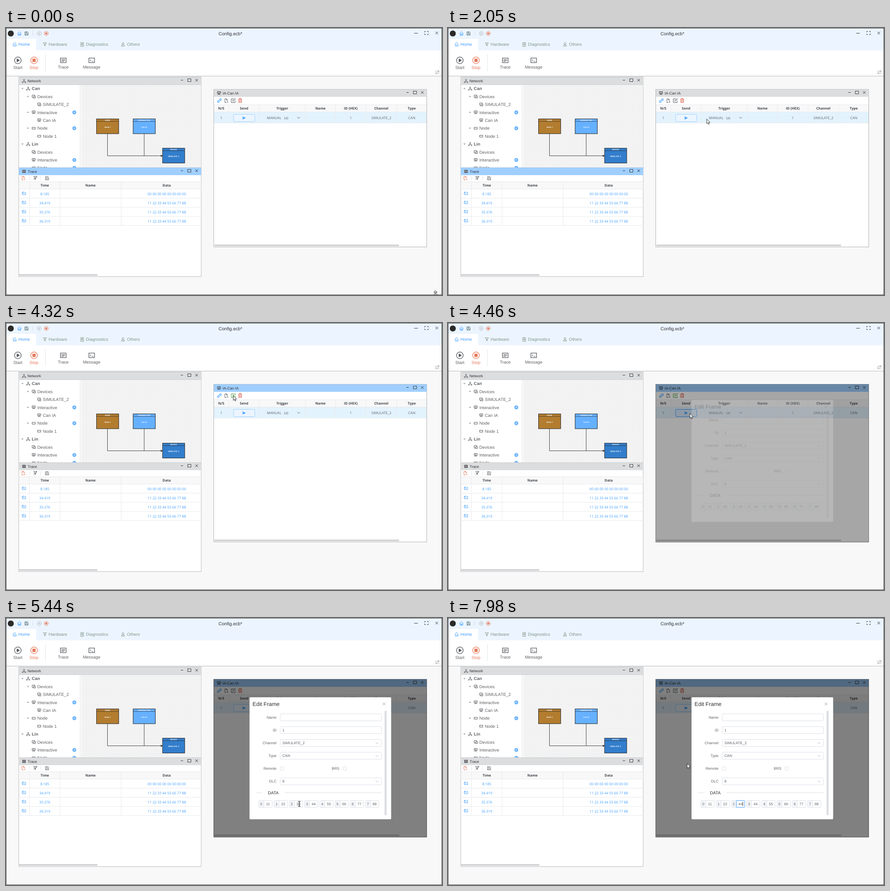
An HTML page for the animation above (8 s loop, 956x586 px).

```html
<!DOCTYPE html>
<html lang="en">
<head>
<meta charset="utf-8">
<title>Config.ecb*</title>
<style>
html, body { margin: 0; width: 100%; height: 100%; overflow: hidden; background: #f8f8f8; }
svg { display: block; }
text { font: 9.44px "Liberation Sans", Arial, sans-serif; fill: #606266; text-rendering: geometricPrecision; }
.m { text-anchor: middle; }
.e { text-anchor: end; }
.b { font-weight: bold; }
.s { font-size: 8.1px; }
.dark { fill: #303133; }
.tab { fill: #83978a; }
.cell { font: 7.7px "Open Sans", "Noto Sans", sans-serif; }
.head { font: bold 7.55px "Open Sans", "Noto Sans", sans-serif; fill: #45484d; }
.tiny { font-size: 3.95px; font-weight: bold; fill: #fff; }
.blue { fill: #409eff; }
.ico { fill: none; stroke: #505358; stroke-width: .95; }
.line { fill: none; stroke: #e8eaec; }
.box { fill: #fff; stroke: #dcdfe6; }

.an, .an * { animation-duration: 8s; animation-iteration-count: infinite; animation-timing-function: linear; }
.an .st { animation-timing-function: step-end; }

#cursor { animation-name: path; }
@keyframes path {
  0% { transform: translate(942px, 583px); }
  5.1%, 8.5% { transform: translate(777px, 387px); }
  16.1%, 17.5% { transform: translate(304px, 321px); }
  20.6%, 22.6% { transform: translate(561px, 205px); }
  27.3%, 33.4% { transform: translate(570px, 196px); }
  36.5% { transform: translate(589px, 199px); }
  39.2%, 41.9% { transform: translate(611px, 190px); }
  45% { transform: translate(592px, 199px); }
  52.2%, 54.8% { transform: translate(498px, 159px); }
  55.7%, 56% { transform: translate(530px, 198px); }
  62.7%, 63% { transform: translate(649px, 388px); }
  65.3%, 73.2% { transform: translate(643px, 408px); }
  76.6% { transform: translate(618px, 393px); }
  80% { transform: translate(640px, 385px); }
  83.4%, 83.8% { transform: translate(669px, 398px); }
  91.1%, 92.9% { transform: translate(672px, 332px); }
  95.4% { transform: translate(741px, 341px); }
  99.7%, 100% { transform: translate(524px, 319px); }
}
#resize { animation-name: resize; }
@keyframes resize { 0% { opacity: 1; } .85%, 100% { opacity: 0; } }
#arrow { animation-name: arrow; }
@keyframes arrow {
  0%, 15.4%, 64%, 100% { opacity: 0; }
  .85%, 17.6%, 74.4% { opacity: 1; }
}
#move { animation-name: move; }
@keyframes move { 0%, 17.6%, 100% { opacity: 0; } 15.4% { opacity: 1; } }
#beam { animation-name: beam; }
@keyframes beam { 0%, 74.4%, 100% { opacity: 0; } 64% { opacity: 1; } }
#press { animation-name: press; }
@keyframes press {
  0%, 8.5%, 17.1%, 31.6%, 53.9%, 69.7%, 71.5%, 100% { opacity: 0; }
  7.6%, 16.2%, 30.7%, 53.1%, 68.85%, 70.6% { opacity: .85; }
}

#traceBar { animation-name: traceBar; }
@keyframes traceBar { 0%, 17.1% { fill: #a0cfff; } 7.6%, 30.7%, 100% { fill: #dcdddf; } }
#iaBar { animation-name: iaBar; }
@keyframes iaBar { 0%, 17.1% { fill: #dcdddf; } 7.6%, 30.7%, 100% { fill: #a0cfff; } }
#edit { animation-name: edit; }
@keyframes edit { 0%, 56.4%, 100% { stroke: #505358; } 51.8% { stroke: #3f9a2f; } }
#send { animation-name: send; }
@keyframes send {
  0%, 56.6%, 100% { fill: #ecf5ff; stroke: #a0cfff; }
  55.2% { fill: #d9ecff; stroke: #409eff; }
}

#shade { animation-name: shade; }
@keyframes shade { 0%, 54.8% { opacity: 0; } 55.7%, 56% { opacity: .35; } 58.4%, 100% { opacity: .5; } }
#dialog { animation-name: dialog; }
@keyframes dialog {
  0%, 54.8% { opacity: 0; transform: translateY(-10px); }
  55.7%, 56% { opacity: .2; transform: translateY(-5.2px); }
  58.4%, 100% { opacity: 1; transform: none; }
}
#focus { animation-name: focus; }
@keyframes focus { 0% { opacity: 0; } 68.85%, 100% { opacity: 1; } }
#picked { animation-name: picked; }
@keyframes picked { 0%, 80%, 100% { opacity: 0; } 70.6% { opacity: 1; } }
#old { animation-name: old; }
@keyframes old { 0% { opacity: 1; fill: #606266; } 70.6% { opacity: 1; fill: #fff; } 80%, 100% { opacity: 0; } }
#one { animation-name: one; }
@keyframes one { 0%, 81.6%, 100% { opacity: 0; } 80% { opacity: 1; } }
#two { animation-name: two; }
@keyframes two { 0% { opacity: 0; } 81.6%, 100% { opacity: 1; } }
#caret { animation-name: caret; }
@keyframes caret { 0%, 87.8% { opacity: 0; } 81.6%, 94%, 100% { opacity: 1; } }
</style>
</head>
<body>
<svg class="an" width="956" height="586" viewBox="0 0 956 586">
<defs>
  <g id="net"><circle cy="-2.6" r="1.2"/><circle cx="-2.8" cy="2.6" r="1.2"/><circle cx="2.8" cy="2.6" r="1.2"/><path d="M0-1.4V.3M-2.5 1.4L0 .3 2.5 1.4"/></g>
  <g id="dev"><path d="M-.8 1.3H-3.4V-3.2H2.6V-1.4M-2.6 3H-.8"/><rect x=".2" y="-.6" width="3.4" height="3.8"/></g>
  <g id="int"><path d="M-3.4-3.3H3.4V1H-3.4ZM0 1V2.4M-2.8 3.4L0 2 2.8 3.4M-1.5-1.2H1.5"/></g>
  <g id="rect"><rect x="-3.4" y="-2" width="6.8" height="4"/></g>
  <g id="file"><path d="M3-.6V-1.4L.4-4H-3V4H.4M.4-4V-1.4H3M1.5 1.3L4 4M4 1.3L1.5 4"/></g>
  <g id="disk"><path d="M-3.6-3.6H2.4L3.6-2.4V3.6H-3.6ZM-1.8 3.4V.6H1.8V3.4M-1.8-3.4V-1.6H1.2V-3.4"/></g>
  <g id="house"><path d="M-4-.2L0-4 4-.2M-3-1V3.8H3V-1M-1 3.6V1H1V3.6"/></g>
  <g id="win" fill="none" stroke="#303133"><path d="M-18.7 0H-13.8M13.3-2.7L18.7 2.7M18.7-2.7L13.3 2.7"/><rect x="-3.5" y="-3" width="7" height="6" stroke-width=".9"/></g>
  <g id="mail" fill="none" stroke="#409eff" stroke-width=".9"><path d="M1-2.6H-3.8V3H3.8V0M-3.6-1.6L0 .9 1.6-.2M2-1.6H4.2M3.1-2.7V-.5"/></g>
  <path id="down" d="M-2.8-1.4L0 1.4 2.8-1.4" fill="none" stroke="#a8abb2" stroke-width=".9"/>
  <pattern id="dots" width="6.75" height="6.75" patternUnits="userSpaceOnUse"><rect width="6.75" height="6.75" fill="#f3f3f3"/><path d="M0 .5H6.75M.5 0V6.75" stroke="#ededed" stroke-width=".7" stroke-dasharray="1 1"/></pattern>
  <clipPath id="treeClip"><rect x="28" y="125" width="135" height="181"/></clipPath>
</defs>

<!-- shell -->
<rect width="956" height="586" fill="#f8f8f8"/>
<rect width="956" height="49" fill="#ecf5ff"/>
<rect y="24" width="66" height="26" fill="#fff"/>
<rect y="49" width="956" height="56" fill="#fff"/>
<path d="M0 105.5H956" stroke="#b9bbbe"/>
<circle cx="10.5" cy="12" r="6.6" fill="#2b2a28"/>
<g class="ico">
  <use href="#house" x="29.5" y="12" stroke="#409eff"/>
  <use href="#disk" x="45" y="12" stroke="#56707a"/>
  <path d="M58.5 7V17" stroke="#d5dde6"/>
  <g stroke="#b4bac2"><circle cx="73" cy="12" r="4.4"/><path d="M71.8 10L75 12 71.8 14Z"/></g>
  <g stroke="#e57a5c"><circle cx="88.3" cy="12" r="4.4"/><rect x="86.7" y="10.4" width="3.2" height="3.2" fill="#e57a5c"/></g>
  <g stroke="#303133"><path d="M895 11.5H903M918 9.5V7.5H920.5M923.5 7.5H926V9.5M926 12.5V14.5H923.5M920.5 14.5H918V12.5M941.5 8L947.5 14M947.5 8L941.5 14"/></g>
  <g stroke="#409eff"><path d="M22 34.4L19 31.8 15 35.2M16 34.8V39.6H18.6"/><circle cx="20.8" cy="38" r="2"/></g>
  <g stroke="#83978a"><path d="M81.5 32.5H89L86.5 35.5H84ZM85.2 35.5V40.2M83 37.5H87.5"/><rect x="164" y="32" width="6" height="8.4"/><path d="M165.5 34.5H168.5M165.5 37H168.5" stroke-width="1.6"/><circle cx="256.5" cy="34" r="1.9"/><path d="M253 39.7Q253 37 255 37H258Q260 37 260 39.7Z"/></g>
</g>
<text class="m" x="492" y="15.6" style="font-size:10.1px;fill:#303133">Config.ecb*</text>
<text class="blue" x="27.3" y="39.4">Home</text>
<text class="tab" x="93.5" y="39.4">Hardware</text>
<text class="tab" x="175.3" y="39.4">Diagnostics</text>
<text class="tab" x="265.3" y="39.4">Others</text>

<!-- ribbon -->
<g class="ico" stroke-width="1.2">
  <circle cx="26" cy="71" r="7.3" stroke-width="1.3"/><path d="M24 67.6L29.6 71 24 74.4Z" fill="#505358"/>
  <g stroke="#e57a5c"><circle cx="61.5" cy="71" r="7.3" stroke-width="1.3"/><rect x="58.4" y="67.9" width="6.2" height="6.2" fill="#e57a5c"/></g>
  <path d="M86.5 58V95" stroke="#e2e4e8"/>
  <rect x="119.4" y="66" width="12.4" height="10" stroke-width="1.2"/><path d="M121.5 69.2H129.7M121.5 71.2H129.7M121.5 73.3H127"/>
  <rect x="181.7" y="66" width="12.4" height="10" stroke-width="1.2"/><path d="M184 69L186.4 71 184 73M188 73.4H191.6"/>
  <path d="M942.5 93.5V100.5H949.5M943 100L949 94M946 93.5H949.5V97M944.5 93.5L949.5 98.5" stroke="#a8abb2"/>
</g>
<text class="m" x="26" y="90.4">Start</text>
<text class="m" x="61.3" y="90.4" style="fill:#e57a5c">Stop</text>
<text class="m" x="125.5" y="89.4">Trace</text>
<text class="m" x="187.8" y="89.4">Message</text>

<!-- network window -->
<rect x="28" y="107.5" width="400" height="199" fill="#fff" stroke="#b9bbbe"/>
<rect x="28.5" y="108" width="399" height="16.5" fill="#dcdddf"/>
<path d="M28 124.5H428" stroke="#d0d2d5"/>
<use class="ico" href="#net" x="39.5" y="116.3"/>
<text class="s dark" x="47" y="119">Network</text>
<use href="#win" x="402" y="114.5"/>
<rect x="162.5" y="125" width="3" height="181" fill="#fafafa"/>
<path d="M162.5 125V306" stroke="#e4e4e4"/>
<rect x="165.5" y="125" width="262" height="181" fill="url(#dots)"/>
<g id="tree" clip-path="url(#treeClip)"></g>
<path d="M222.5 232V280.5H342M303 232V280.5" fill="none" stroke="#444"/>
<path d="M344 280.5L339.5 278.3V282.7Z" fill="#222"/>
<g id="blocks"></g>

<!-- trace window -->
<rect x="28" y="306.5" width="400" height="239" fill="#fff" stroke="#b9bbbe"/>
<rect id="traceBar" class="st" x="28" y="306.5" width="400" height="16.5" fill="#a0cfff"/>
<rect x="35.8" y="311.5" width="7.4" height="6.4" fill="#505358"/><path d="M37 313.6H42M37 315.6H42" stroke="#dcdddf" stroke-width=".8"/>
<text class="s dark" x="47.6" y="318">Trace</text>
<use href="#win" x="402" y="313.3"/>
<g class="ico">
  <use href="#file" x="38" y="329.5" stroke="#e57a5c"/>
  <path d="M60.5 326H68L65 329.4V332.5L63.2 331.5V329.4ZM60.5 333L68 325.5"/>
  <use href="#disk" x="90" y="329.8" stroke="#777"/>
  <path d="M52 325V334M76 325V334" stroke="#dcdfe6"/>
</g>
<rect x="28.5" y="337" width="399" height="17" fill="#f8f8f9"/>
<path class="line" d="M28 337.5H428M28 353.5H428M28 373.5H428M28 393.5H428M28 413.5H428M28 433.5H428M51.5 337V434M118.5 337V434M252.5 337V434"/>
<g id="trace"></g>
<rect x="28.5" y="540.5" width="172" height="3" rx="1" fill="#c9cacc"/>

<!-- interactive window -->
<rect x="455.5" y="134.5" width="467" height="346" fill="#fff" stroke="#b0b2b5"/>
<rect id="iaBar" class="st" x="456" y="134.5" width="466.5" height="16.5" fill="#dcdddf"/>
<use class="ico" href="#int" x="467" y="143" style="stroke:#303133"/>
<text class="s dark" x="475" y="145.7">IA-Can IA</text>
<use href="#win" x="896.7" y="141.5"/>
<g class="ico">
  <g stroke="#409eff" stroke-width="1.1"><path d="M467.4 157.4L469 155.8Q470.6 154.8 471.8 156 473 157.4 471.6 158.8L470 160.4M468.4 161.4L466.6 163Q465 164 464 162.8 462.8 161.4 464.2 160L465.8 158.4M466 161L470 157.4"/></g>
  <use href="#file" x="483" y="159.5"/>
  <path id="edit" class="st" d="M499 155.5H494V163.7H502.5V159.5M497 160.6L497.4 158.8 502 154.4 503.4 155.8 498.8 160.3Z"/>
  <path d="M509.5 156.3H517.5M512 156V154.8H515V156M510.5 156.5V163.5H516.5V156.5M512.5 158.5V161.7M514.5 158.5V161.7" stroke="#e2614f" stroke-width="1.1"/>
</g>
<rect x="456" y="168" width="466" height="17" fill="#f8f8f9"/>
<rect x="456" y="185" width="466" height="23.5" fill="#e3f3fd"/>
<path class="line" d="M456 168.5H922M456 184.5H922M456 208.5H922M488.5 168V208M555.5 168V208M656.5 168V208M722.5 168V208M789.5 168V208M856.5 168V208"/>
<g id="grid"></g>
<rect id="send" class="st" x="499" y="189.5" width="46.5" height="16" rx="2" fill="#ecf5ff" stroke="#a0cfff"/>
<path d="M518.2 194L526 197.5 518.2 201 519.6 197.5Z" fill="#409eff"/>
<use href="#down" x="641.7" y="197" style="stroke:#606266"/>
<path d="M638.7 195.4L641.7 198.4 644.7 195.4" fill="none" stroke="#70757c"/>
<rect x="457" y="475.5" width="405" height="3" rx="1" fill="#c9cacc"/>

<!-- dialog -->
<rect id="shade" x="455" y="134" width="468" height="347.5" opacity="0"/>
<g id="dialog" opacity="0">
  <rect x="534" y="174" width="310.5" height="267.7" rx="1.8" fill="#fff"/>
  <text class="dark" x="540.6" y="192.6" style="font-size:12.1px">Edit Frame</text>
  <path d="M826 185.6L832 191.6M832 185.6L826 191.6" stroke="#909399" stroke-width=".9"/>
  <rect x="830" y="203.5" width="4.6" height="229.5" rx="2" fill="#dcdee0"/>
  <g id="form"></g>
  <rect class="box" x="601.3" y="326.6" width="7.4" height="7.4" rx="1"/>
  <rect class="box" x="739.2" y="326.6" width="7.4" height="7.4" rx="1"/>
  <path d="M548 383.5H561.5M611 383.5H823.5" stroke="#dcdfe6"/>
  <text class="dark m" x="586" y="387">DATA</text>
  <g id="bytes"></g>
  <rect id="focus" class="st" x="632.2" y="400.5" width="18.4" height="15" rx="1" fill="none" stroke="#409eff" opacity="0"/>
  <rect id="picked" class="st" x="636.5" y="403" width="9.6" height="10" fill="#3390ff" opacity="0"/>
  <text id="old" class="s m st" x="641.3" y="411">33</text>
  <text id="one" class="s m st" x="641.3" y="411" opacity="0">4</text>
  <text id="two" class="s m st" x="641.3" y="411" opacity="0">44</text>
  <path id="caret" class="st" d="M646.5 403.5V412.5" stroke="#303133" opacity="0"/>
</g>

<rect x=".5" y=".5" width="955" height="585" fill="none" stroke="#4a4d52"/>

<!-- pointer -->
<g id="cursor" stroke-linejoin="round">
  <circle id="press" class="st" r="8" fill="#f4e61e" opacity="0"/>
  <path id="resize" class="st" d="M0-6.5L3.5-2.5H1V2.5H3.5L0 6.5-3.5 2.5H-1V-2.5H-3.5Z" fill="#fff" stroke="#222"/>
  <path id="arrow" class="st" d="M.4.5V10.8L2.8 8.6 4.4 12.3 6 11.6 4.4 8H7.6Z" fill="#fff" stroke="#222" stroke-width=".9" opacity="0"/>
  <path id="move" class="st" d="M0-7L2.4-4.2H.9V-.9H4.2V-2.4L7 0 4.2 2.4V.9H.9V4.2H2.4L0 7-2.4 4.2H-.9V.9H-4.2V2.4L-7 0-4.2-2.4V-.9H-.9V-4.2H-2.4Z" fill="#fff" stroke="#333" stroke-width=".8" opacity="0"/>
  <path id="beam" class="st" d="M-2.6-5.5H-.7L0-5 .7-5.5H2.6M0-5V5M-2.6 5.5H-.7L0 5 .7 5.5H2.6" fill="none" stroke="#222" stroke-width="1.1" opacity="0"/>
</g>
</svg>
<script>
const fill = (id, parts) => document.getElementById(id).innerHTML = parts.join('');
const text = (x, y, s, cls = '') => `<text x="${x}" y="${y}" class="${cls}">${s}</text>`;

// level, icon, label, expandable, addable
const tree = [
  [0, 'net', 'Can', 1], [1, 'dev', 'Devices', 1], [2, 'dev', 'SIMULATE_2'],
  [1, 'int', 'Interactive', 1, 1], [2, 'int', 'Can IA'],
  [1, 'rect', 'Node', 1, 1], [2, 'rect', 'Node 1'],
  [0, 'net', 'Lin', 1], [1, 'dev', 'Devices'], [1, 'int', 'Interactive', 0, 1], [1, 'rect', 'Node', 0, 1]
];
fill('tree', tree.map(([lv, icon, label, open, add], i) => {
  const y = 133 + i * 17.4, x = 48.6 + lv * 12.1;
  return `<use class="ico" href="#${icon}" x="${x}" y="${y}"/>` +
    text(x + 8, y + 3.4, label, lv ? '' : 'b') +
    (open ? `<path d="M${x - 15} ${y - 1.2}h5l-2.5 3z" fill="#a0a3a8"/>` : '') +
    (add ? `<circle cx="149.8" cy="${y}" r="4.2" fill="#5cacff"/><path d="M147.3 ${y}h5m-2.5-2.5v5" stroke="#d9ecff"/>` : '');
}));

const blocks = [
  [198.5, 199.5, '#b37d30', 'NODE', 'Node 1'],
  [278.8, 199.5, '#66b1ff', 'INTERACTIVE', 'Can IA'],
  [343.3, 263.8, '#337ecc', 'DEVICE', 'SIMULATE_2']
];
fill('blocks', blocks.map(([x, y, color, kind, name]) =>
  `<rect x="${x}" y="${y}" width="48.6" height="32.5" fill="${color}" stroke="#222"/>` +
  `<path d="M${x} ${y + 5.4}h48.6" stroke="#222" stroke-width=".7"/>` +
  text(x + 24.3, y + 4.2, kind, 'tiny m') + text(x + 24.3, y + 19, name, 'tiny m')));

const times = ['8.185', '34.419', '35.376', '36.319'];
fill('trace', [
  text(85, 348.3, 'Time', 'head m'), text(185.3, 348.3, 'Name', 'head m'), text(352.3, 348.3, 'Data', 'head m'),
  ...times.map((time, i) => {
    const y = 364 + i * 20;
    return `<use href="#mail" x="39.5" y="${y - 1.3}"/>` + text(85, y + 2.9, time, 'cell m blue') +
      text(352.5, y + 2.9, i ? '11 22 33 44 55 66 77 88' : '00 00 00 00 00 00 00 00', 'cell m blue');
  })
]);

const cols = [[472, 'N/S', '1'], [522, 'Send', ''], [605.8, 'Trigger', ''], [689.5, 'Name', ''],
  [756, 'ID (HEX)', '1'], [823, 'Channel', 'SIMULATE_2'], [889.7, 'Type', 'CAN']];
fill('grid', [
  ...cols.map(([x, name, value]) => text(x, 179.2, name, 'head m') + text(x, 199.9, value, 'cell m')),
  text(572, 199.9, 'MANUAL', 'cell'), text(610, 199.9, '(a)', 'cell')
]);

// label, centre, value, is a select
const fields = [['Name', 218, ''], ['ID', 246, '1'], ['Channel', 274.2, 'SIMULATE_2', 1],
  ['Type', 302.2, 'CAN', 1], ['DLC', 358.5, '8', 1]];
fill('form', [
  ...fields.map(([label, y, value, pick]) =>
    text(593, y + 2.8, label, 's e') +
    `<rect class="box" x="601.2" y="${y - 7.7}" width="222.2" height="15.4" rx="2"/>` +
    text(606, y + 2.9, value, 's') + (pick ? `<use href="#down" x="813.5" y="${y + .3}"/>` : '')),
  text(593, 333, 'Remote', 's e'), text(731, 333, 'BRS', 's e')
]);

fill('bytes', Array.from({ length: 8 }, (_, i) => {
  const x = 554.4 + i * 33.4;
  return `<rect x="${x}" y="400.5" width="29.4" height="15" rx="1.5" class="box"/>` +
    `<path d="M${x + .5} 401h10.5v14h-10.5z" fill="#f5f7fa"/><path d="M${x + 11} 400.5v15" stroke="#dcdfe6"/>` +
    text(x + 5.4, 411, i, 's m') + (i === 2 ? '' : text(x + 20, 411, `${i + 1}`.repeat(2), 's m'));
}));
</script>
</body>
</html>
```
